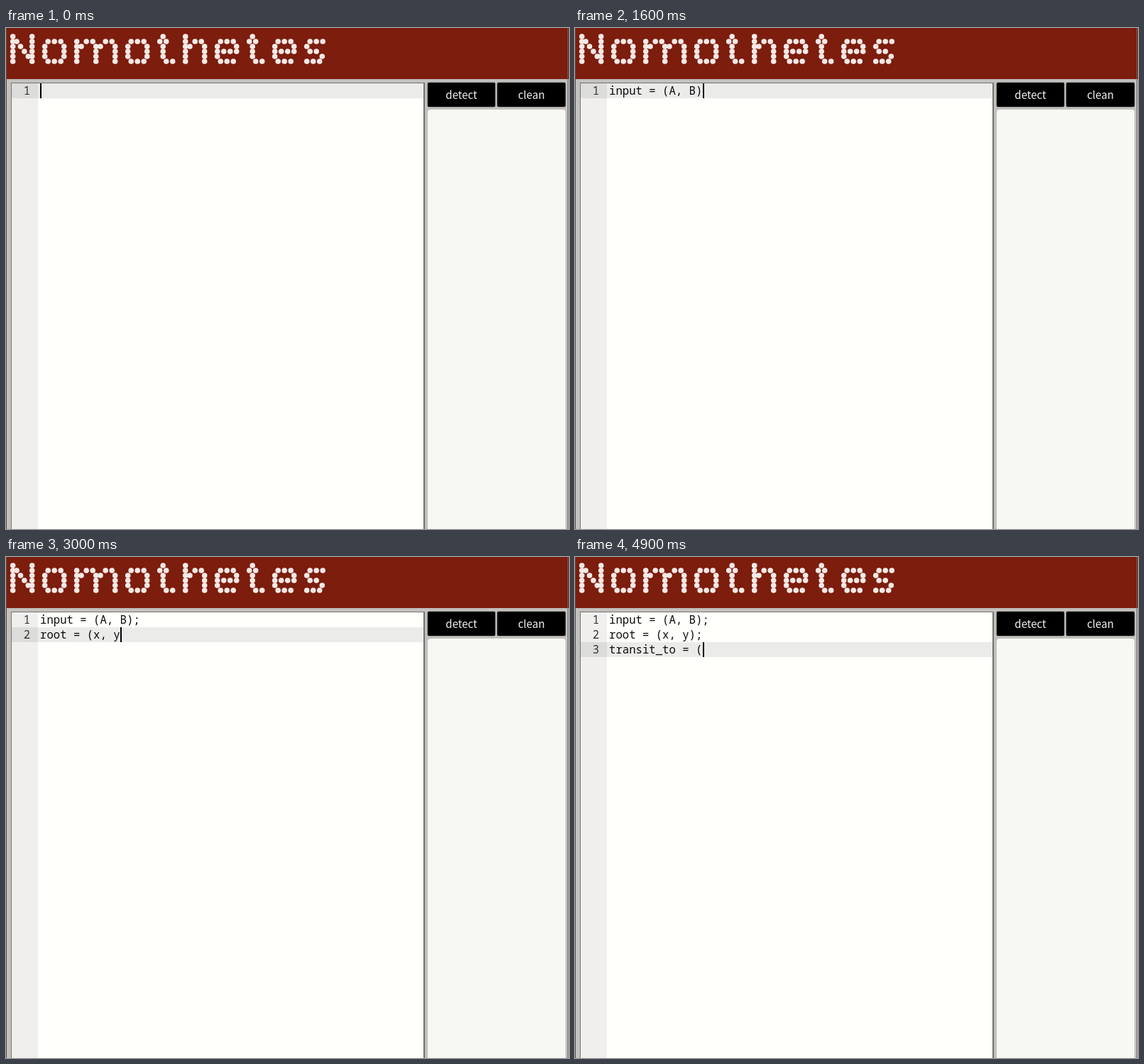
These frames come from a looping animation (793 by 706 pixels, 5100 ms). An HTML page:

```html
<!DOCTYPE html>
<html lang="en">
<head>
<meta charset="utf-8">
<title>Nomothetes</title>
<style>
html, body { margin: 0; width: 100%; height: 100%; overflow: hidden; }
body { position: relative; background: #c3c1be; }
body div, svg { position: absolute; box-sizing: border-box; }
#head { left: 0; top: 0; width: 793px; height: 72px; background: #7c1d0d; }
#title { left: 0; top: 0; }
.edge { top: 0; height: 706px; width: 1px; }
#editor {
  left: 7px; top: 77px; width: 583px; height: 640px; overflow: hidden;
  border: 1px solid #777572; border-right: 2px solid #74726f; background: #fffffb;
  font: 15.63px/21px "Noto Sans Mono", "DejaVu Sans Mono", monospace; color: #0c0c0c;
}
#gutter { left: 0; top: 0; width: 37px; height: 640px; background: #f0efed; }
#band { left: 0; width: 581px; height: 21px; background: linear-gradient(90deg, #dcdcdb 37px, #ebebea 37px); }
#rows { left: 0; top: 0; }
.num { left: 0; width: 26px; height: 21px; text-align: right; color: #333; }
.row { left: 40px; height: 21px; white-space: pre; }
#caret { width: 2px; height: 21px; background: #000; }
.button {
  top: 77px; height: 34px; border-radius: 2px; background: #000; color: #f4f4f4;
  box-shadow: 0 0 1.5px #000;
  font: 15px/34px "Noto Sans CJK JP", "Noto Sans CJK SC", "Noto Sans", sans-serif; text-align: center;
}
#panel { left: 594px; top: 115px; width: 194px; height: 600px; border-radius: 4px; background: #f7f7f4; }
</style>
</head>
<body>
<div id="head"></div>
<svg id="title" width="460" height="71" role="img" aria-label="Nomothetes" fill="#f5e9e6"></svg>
<div class="edge" style="left:0;background:#5a4f48"></div>
<div class="edge" style="left:791px;background:#6a6662"></div>
<div id="editor">
  <div id="gutter"></div>
  <div id="band"></div>
  <div id="rows"></div>
  <div id="caret"></div>
</div>
<div class="button" style="left:594px;width:95px">detect</div>
<div class="button" style="left:692px;width:96px">clean</div>
<div id="panel"></div>
<script>
const $ = id => document.getElementById(id);

// Dotted title: letters are built from stems, bars and arches on a grid.
const PITCH = 9, ROW = 7;
const run = (n, x, y, dx, dy) => Array.from({ length: n }, (_, i) => [x + i * dx, y + i * dy]);
const stem = (x, top, bottom) => run(bottom - top + 1, x, top, 0, 1);
const bar = (x, y, n) => run(n, x, y, 1, 0);
const arch = x => [[x + .7, 2], ...bar(x + 1.5, 1, 2), ...stem(x + 3, 2, 5)];
const caps = [...bar(.5, 1, 3), ...bar(.5, 5, 3)];
const glyphs = {
  N: [...stem(0, 0, 5), ...stem(3, 0, 5), ...run(4, .6, 1, .6, 1)],
  o: [...caps, ...stem(0, 2, 4), ...stem(3, 2, 4)],
  m: [...stem(0, 1, 5), ...arch(0), ...arch(3)],
  t: [...stem(.5, 0, 0), ...bar(0, 1, 2), ...stem(.5, 2, 4), ...bar(1, 5, 2)],
  h: [...stem(0, 0, 5), ...arch(0)],
  e: [...caps, ...stem(0, 2, 4), ...stem(3, 2, 2), ...bar(1, 3, 3)],
  s: [...bar(.5, 1, 3), ...stem(0, 2, 2), ...bar(.5, 3, 2), ...stem(2.4, 4, 4), ...bar(0, 5, 3)]
};
let left = 9.7, dots = "";
for (const ch of "Nomothetes") {
  const glyph = glyphs[ch];
  for (const [x, y] of glyph) {
    dots += `<circle cx="${left + x * PITCH}" cy="${12 + y * ROW}" r="3.8"/>`;
  }
  left += (Math.max(...glyph.map(p => p[0])) + 2 | 0) * PITCH;
}
$("title").innerHTML = dots;

// Typing runs on an even beat, at a steady pace between key points [beat, characters].
const LOOP = 5100, BEAT = 137.2, LINE = 21, CHAR = 9.378;
const text = "input = (A, B);\nroot = (x, y);\ntransit_to = (";
const keys = [[0, 0], [4, 6], [6, 6], [7, 8], [13, 16], [22, 28], [28, 30], [29, 31], [36, 45]];

// The clock shows beats rounded to tenths of a second.
const beatTime = b => Math.round(b * BEAT / 100) * 100;

function typed(t) {
  let beat = 0;
  while (beat < 36 && beatTime(beat + 1) <= t) beat++;
  const i = Math.max(1, keys.findIndex(k => k[0] >= beat));
  const [b0, n0] = keys[i - 1], [b1, n1] = keys[i];
  return Math.floor(n0 + (n1 - n0) * (beat - b0) / (b1 - b0));
}

const rows = text.split("\n").map((_, i) => {
  const make = cls => {
    const el = document.createElement("div");
    el.className = cls;
    el.style.top = i * LINE + "px";
    $("rows").append(el);
    return el;
  };
  return { num: make("num"), code: make("row") };
});

function draw(t) {
  const lines = text.slice(0, typed(t)).split("\n");
  const last = lines.length - 1;
  rows.forEach(({ num, code }, i) => {
    num.textContent = i <= last ? i + 1 : "";
    code.textContent = lines[i] || "";
  });
  $("band").style.top = $("caret").style.top = last * LINE + "px";
  $("caret").style.left = 40.4 + lines[last].length * CHAR + "px";
}

const start = performance.now();
function tick() {
  draw((performance.now() - start) % LOOP);
  requestAnimationFrame(tick);
}
tick();
</script>
</body>
</html>
```
